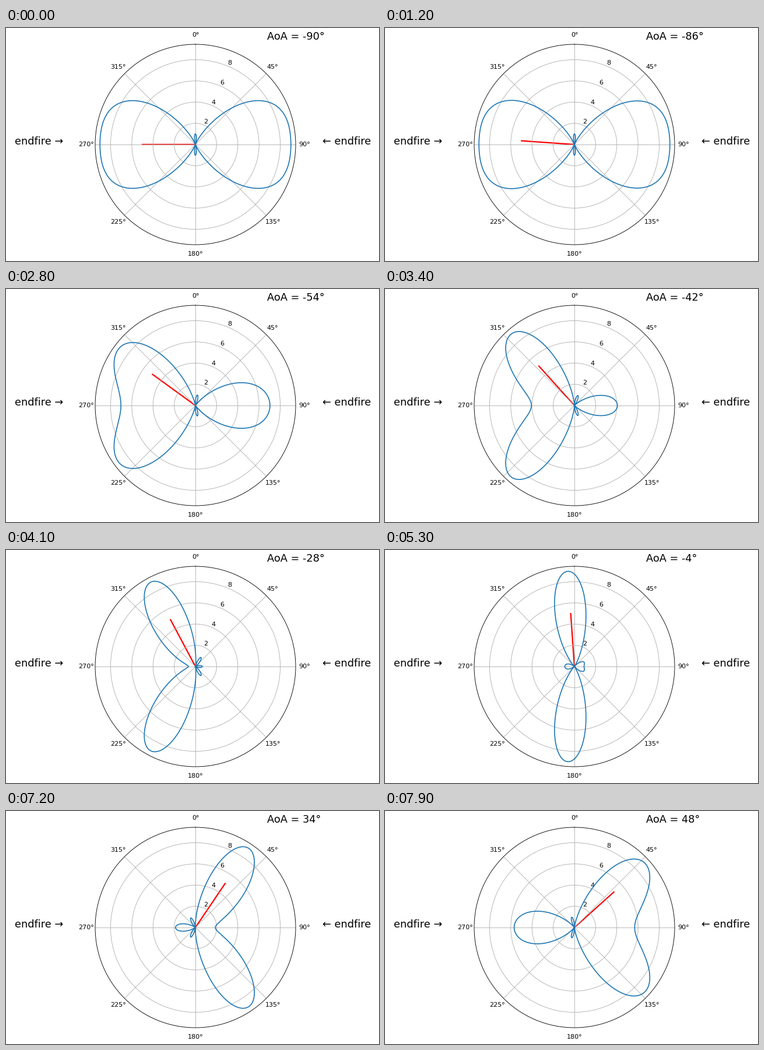
A matplotlib script for the animation above (8000 ms loop, 640x400 px).

```python
import numpy as np
import matplotlib.pyplot as plt
from matplotlib.animation import FuncAnimation

W, H, DPI = 640, 400, 80
CX, CY, RADIUS = 325, 200, 172
ELEMENTS = 3
SPACING = 0.5  # wavelengths
HOLD = 10      # still frames at the start
FRAMES = 80

plt.rcParams["font.family"] = "DejaVu Sans"
theta = np.linspace(-np.pi, np.pi, 1000)


def beam_power(aoa):
    """Response of a uniform line array steered to aoa (radians)."""
    phase = 2 * np.pi * SPACING * (np.sin(theta) - np.sin(aoa))
    n = np.arange(ELEMENTS)[:, None]
    return np.abs(np.exp(1j * n * phase).sum(axis=0)) ** 2


def label(x, y, text):
    return fig.text(x / W, 1 - y / H, text, fontsize=16)


fig = plt.figure(figsize=(W / DPI, H / DPI), dpi=DPI)
box = [(CX - RADIUS) / W, 1 - (CY + RADIUS) / H, 2 * RADIUS / W, 2 * RADIUS / H]
ax = fig.add_axes(box, projection="polar")
ax.set_theta_zero_location("N")
ax.set_theta_direction(-1)
ax.set_ylim(0, 1.05 * ELEMENTS ** 2)
ax.set_yticks([2, 4, 6, 8])

# The pointer lies under the grid lines
pointer, = ax.plot([], [], color="red", lw=2, zorder=1)
beam, = ax.plot([], [], color="C0", lw=1.5)

label(14.6, 200, "endfire →")
label(543, 200, "← endfire")
caption = label(448, 20, "")


def update(i):
    deg = -90 + 2 * max(0, i - HOLD)
    aoa = np.deg2rad(deg)
    beam.set_data(theta, beam_power(aoa))
    pointer.set_data([aoa, aoa], [0, 5])
    caption.set_text(f"AoA = {deg}°")
    return beam, pointer, caption


anim = FuncAnimation(fig, update, frames=FRAMES, interval=100,
                     repeat=True, repeat_delay=0)
plt.show()
```
